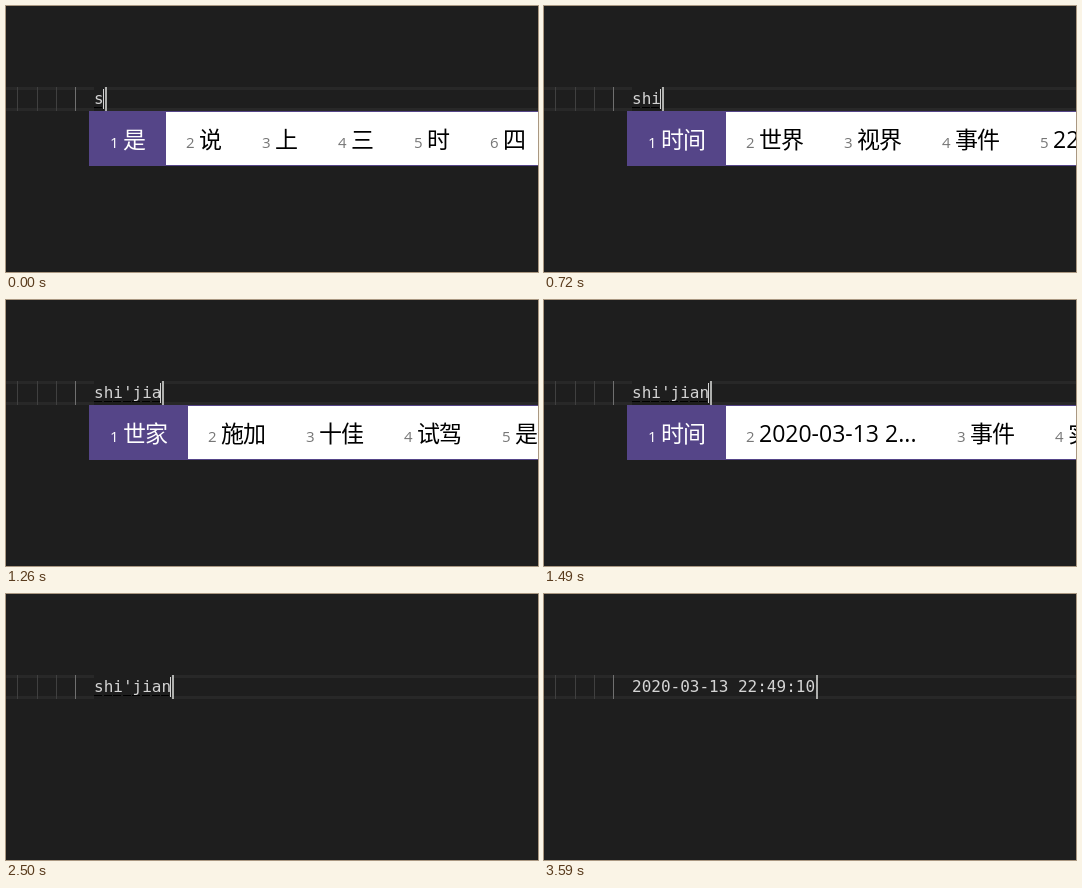
Animation, 532 px wide and 266 px high, one loop 3990 ms. Source, as an HTML page with a canvas:

```html
<!DOCTYPE html>
<html lang="zh-CN">
<head>
<meta charset="utf-8">
<title>Input method date</title>
<style>
  html, body { margin: 0; width: 100%; height: 100%; overflow: hidden; background: #1e1e1e; }
  canvas { display: block; width: 532px; height: 266px; }
</style>
</head>
<body>
<canvas id="stage" width="532" height="266"></canvas>
<script>
const ctx = document.getElementById('stage').getContext('2d', { alpha: false });
const LOOP = 3990;
const EDITOR = '16px "DejaVu Sans Mono", monospace';
const WORD = '23px "Open Sans", "Noto Sans CJK SC", "Noto Sans CJK JP", sans-serif';
const INDEX = '15px "Open Sans", sans-serif';
const LEFT = 88, ADVANCE = 9.62, TOP = 81, LINE = 24;
const PURPLE = '#554588';
const DONE = '2020-03-13 22:49:10';
const NONE = 0, EDIT = 1, BOTH = 2;

const words = {
  s: '是|说|上|三|时|四',
  sh: '是|上|说|时|事|使',
  shi: '是|时|事|使|十|市',
  shij: '时间|世界|视界|事件|22:49:08',
  shiji: '实际|世纪|时机|事迹|十几',
  shijia: '世家|施加|十佳|试驾|是假',
  shijian: '时间|2020-03-13 2...|事件|实践'
};

// start time, typed text, candidate list, visible carets
const steps = [
  [0, 's', 's', BOTH],
  [400, 's', 'sh', BOTH],
  [470, 'sh', 'sh', BOTH],
  [550, 'shi', 'shi', BOTH],
  [720, 'shi', 'shij', BOTH],
  [810, "shi'j", 'shij', BOTH],
  [870, "shi'ji", 'shiji', BOTH],
  [1260, "shi'jia", 'shijia', BOTH],
  [1420, "shi'jia", 'shijian', BOTH],
  [1490, "shi'jian", 'shijian', BOTH],
  [1970, "shi'jian", 'shijian', NONE],
  [2430, "shi'jian", 'shijian', EDIT],
  [2500, "shi'jian", '', BOTH],
  [2580, DONE, '', EDIT],
  [3040, DONE, '', NONE],
  [3590, DONE, '', EDIT]
];

function box(x, y, w, h, color) {
  ctx.fillStyle = color;
  ctx.fillRect(x, y, w, h);
}

function write(text, x, y, font, color, spacing = 0) {
  ctx.font = font;
  ctx.letterSpacing = spacing + 'px';
  ctx.fillStyle = color;
  ctx.fillText(text, x, y);
}

function drawEditor(text, caret) {
  const end = Math.round(LEFT + text.length * ADVANCE);
  box(0, 0, 532, 266, '#1e1e1e');
  box(0, TOP, 532, 3, '#282828');
  box(0, TOP + 21, 532, 3, '#282828');
  for (const x of [11, 31, 50]) box(x, TOP, 1, LINE, '#404040');
  box(69, TOP, 1, LINE, '#707070');

  if (text !== DONE) {
    box(LEFT, TOP, end - LEFT, LINE, '#1e1e1e');
    for (let i = 0; i < text.length; i++) {
      box(Math.round(LEFT + i * ADVANCE), 101, 8, 1, '#000');
    }
  }
  write(text, LEFT, 98, EDITOR, '#d4d4d4');
  if (caret === BOTH) box(end - 1, TOP + 2, 1, 20, '#d4d4d4');
  if (caret) box(end + 1, TOP, 2, LINE, '#aeafad');
}

function drawCandidates(list) {
  box(83, 105, 449, 55, PURPLE);
  box(84, 106, 448, 53, '#fff');
  let x = 84;
  list.split('|').forEach((word, i) => {
    const spacing = word > '\u2fff' ? -1 : 0;
    ctx.font = WORD;
    ctx.letterSpacing = spacing + 'px';
    const width = Math.round(ctx.measureText(word).width) + 54;
    if (!i) box(x, 106, width, 53, PURPLE);
    write(i + 1, x + 20, 142, INDEX, i ? '#767676' : '#fff');
    write(word, x + 33, 142, WORD, i ? '#000' : '#fff', spacing);
    x += width;
  });
}

function draw(now) {
  const t = now % LOOP;
  const [, text, key, caret] = steps.findLast(step => step[0] <= t);
  drawEditor(text, caret);
  if (key) drawCandidates(words[key]);
}

const start = performance.now();
function tick() {
  draw(performance.now() - start);
  requestAnimationFrame(tick);
}
tick();
</script>
</body>
</html>
```
